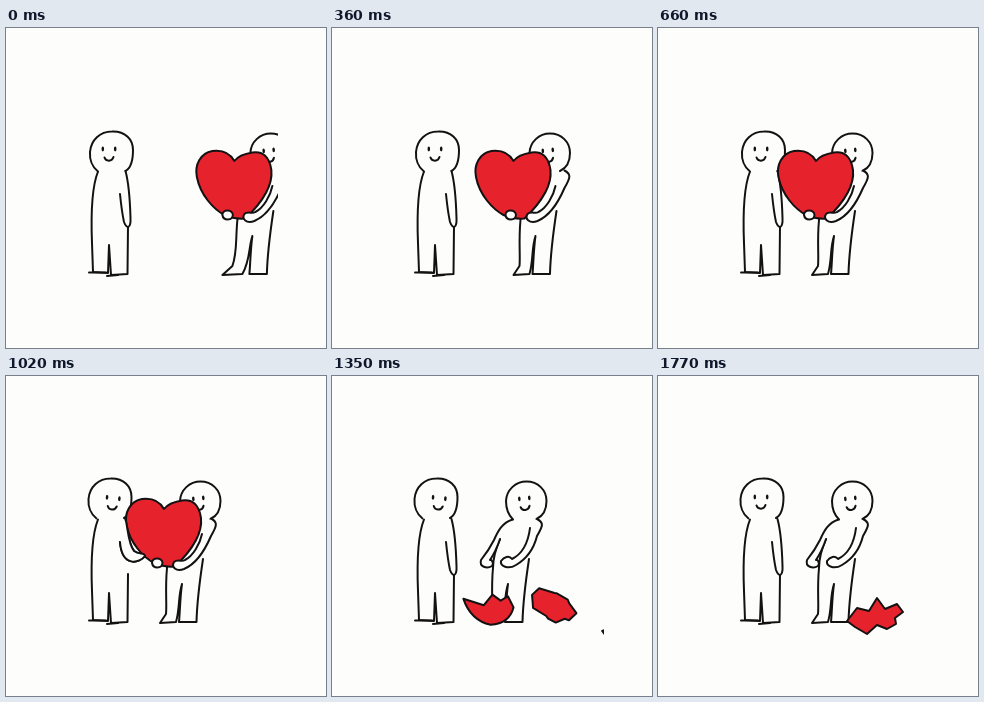
Animation of 320x320 px, one loop 1800 ms. Source, as an HTML page with a canvas:

```html
<!DOCTYPE html>
<html>
<head>
<meta charset="utf-8">
<style>
html, body { margin: 0; height: 100%; overflow: hidden; background: #fdfefc; }
canvas { display: block; }
</style>
</head>
<body>
<canvas width="320" height="320"></canvas>
<script>
const ctx = document.querySelector('canvas').getContext('2d');
const LOOP = 1800, PAPER = '#fdfefc', INK = '#141112', RED = '#e6232c';

const ramp = (t, a, b) => Math.min(1, Math.max(0, (t - a) / (b - a)));

// Piecewise linear value through [time, value] pairs
function track(t, keys) {
  let v = keys[0][1];
  for (let i = 1; i < keys.length; i++)
    v += (keys[i][1] - keys[i - 1][1]) * ramp(t, keys[i - 1][0], keys[i][0]);
  return v;
}

// Blend two paths that share the same commands
function morph(a, b, k) {
  const to = b.match(/[\d.]+/g);
  let i = 0;
  return a.replace(/[\d.]+/g, n => +n + (to[i++] - n) * k);
}

function draw(d, fill) {
  const path = new Path2D(d);
  if (fill) {
    ctx.fillStyle = fill;
    ctx.fill(path);
  }
  ctx.stroke(path);
}

function shifted(x, y, paint) {
  ctx.save();
  ctx.translate(x, y);
  paint();
  ctx.restore();
}

function face(x, y, gap, tilt) {
  shifted(x, y, () => {
    ctx.rotate(tilt);
    ctx.fillStyle = INK;
    for (const side of [-1, 1]) {
      ctx.beginPath();
      ctx.ellipse(side * gap, 0, 1.3, 2.4, 0, 0, 7);
      ctx.fill();
    }
    draw('M-4.5 8.5C-3 12.8 3 12.8 4.5 8');
  });
}

const heart = 'M158 133C153 124 144 122 136 123C124 125 118 137 120.5 149C124 167 137 181 148 187C155 190 163 191 169 190.5C181 179 197 161 195 142C193 128 186 123 176 124.5C167 126 161 129 158 133Z';

const leftArm = {
  idle: 'M119.5 143C123 156 124 172 124.5 190C125 200 121 202 118 194C116.5 187 115 176 114 166',
  hold: 'M119.5 143C122 152 122 168 128 175C133 179 139 176 139 180C134 187 116 192 114 166'
};

const rightArm = {
  hold: 'M205 142.5C212 146 211 150 205 160C199 174 190 188 178 193C170 196 165 191 168 186C171 183 176 186 179 184C187 180 194 168 196 158',
  free: 'M205 143C213 147 210 151 205 160C202 172 196 182 184 189C176 194 168 190 169 185C172 181 177 179 180 183C190 178 196 168 198 152'
};

const shards = [
  { x: 182, y: 230,
    from: 'M157 214L177 225L186 217L193 223L199 219L205 231Q202 246 185 247Q164 242 157 214Z',
    to: 'M96 235L117 235L125 221L135 227L144 222L149 232Q143 250 122 251Q104 248 96 235Z' },
  { x: 225, y: 220,
    from: 'M208 200L213 198L231 204L229 214L242 217L236 227L244 238L237 246L229 239L220 242L214 238L218 227L204 218Z',
    to: 'M189 245L199 232L211 235L219 222L227 233L239 228L245 236L237 242L238 248L229 253L219 249L209 258L197 251Z' },
  { x: 272, y: 225, fly: 60,
    from: 'M249 236L257 229L258 221L273 205L300 215L290 240L262 244L252 245Z' },
  { x: 248, y: 256, fly: 60,
    from: 'M245 255L250 253L251 258L248 259Z' }
];

function leftFigure(t, arm, kick) {
  const lean = ramp(t, 660, 840);
  const look = t < 1650 ? lean : 0;
  draw('M92 143.5C85 161 85 190 86 215L87 244L102 245L103 217L105 247L121.5 246L122 198', PAPER);
  if (kick) {
    ctx.fillStyle = PAPER;
    ctx.fillRect(99, 203, 26, 47);
    draw('M102 236C101 222 103 216 110 216C117 216 119 225 121 234');
    draw('M125 197C132 202 133 208 128 214L137 216');
  } else {
    draw('M101 248L112 247');
  }
  draw('M83 244.5L100 244.5');
  shifted(-1.5 * lean, -lean, () => {
    draw('M92 143.5C86 139 83.5 131 84 124C85 112 94 103.5 106 103.5C119 103 127 111 127 122C127 132 125 140 119.5 143', PAPER);
  });
  face(103 + 4.2 * look, 121 + look, 6.2, 0.12 * look);
  draw(arm, PAPER);
}

function rightBody(swing) {
  const foot = 154 - swing;
  draw(`M168 163C164 172 161 180 161 192C159 213 161 ${228 - swing / 2} ${160 - swing / 2} 238L${foot} 247L${170 - swing / 2} 246C174 232 172 220 176 208C174 222 174 236 173 246L190.5 246C191 225 194 203 197 183`, PAPER);
}

function rightHead() {
  draw('M181 143.5C176.5 139 174 132 174 125C174.5 114 183.5 105.5 194.5 105.5C206 105.5 214.5 114 214.5 125C214.5 134 211 140 204.5 143', PAPER);
  face(192.3, 122.3, 5, -0.1);
}

function rightArms(free) {
  if (free > 0.5) {
    draw('M180.5 143.5C170 147 166 155 162 164C158 172 153 179 149 184C147 191 155 193 160 190C163 186 158 183 158 184C162 178 165 172 168 163', PAPER);
  } else {
    draw('M146 187C146 181 156 181 156.5 187C156 193 147 193 146 187Z', PAPER);
  }
  draw(morph(rightArm.hold, rightArm.free, free), PAPER);
}

function drawShards(t) {
  const burst = ramp(t, 1140, 1200);
  const slide = ramp(t, 1200, 1560);
  shards.forEach((s, i) => {
    if (i > 1 && slide === 1) return;
    const kicked = i === 0 ? -115 * ramp(t, 1590, 1770) : 0;
    const x = (157 - s.x) * (1 - burst) + (s.fly || 0) * slide + kicked;
    const y = (210 - s.y) * (1 - burst);
    shifted(x, y, () => draw(morph(s.from, s.to || s.from, slide), RED));
  });
}

function render(t) {
  ctx.fillStyle = PAPER;
  ctx.fillRect(0, 0, 320, 320);
  ctx.save();
  ctx.beginPath();
  ctx.rect(48, 0, 224, 320);
  ctx.clip();
  ctx.lineWidth = 2;
  ctx.lineCap = ctx.lineJoin = 'round';
  ctx.strokeStyle = INK;

  const walk = track(t, [[0, 70.5], [360, 23.5], [540, 21], [660, 0]]);
  const sway = track(t, [[0, 0], [360, 4], [540, 4], [660, 0]]);
  const swing = track(t, [[0, 8], [360, 0], [540, 0], [600, 5], [660, 0]]);
  const reach = track(t, [[720, 0], [840, 1], [1080, 1], [1170, 0]]);
  const free = ramp(t, 1080, 1140);
  const arm = morph(leftArm.idle, leftArm.hold, reach);

  leftFigure(t, arm, t >= 1500 && t < 1650);
  shifted(walk + sway, 0, () => rightBody(swing));
  shifted(walk, 0, () => {
    rightHead();
    if (t < 1140) shifted(0, 55 * free * free, () => draw(heart, RED));
  });
  shifted(walk + sway, 0, () => rightArms(free));
  if (reach > 0.5) draw(arm, PAPER);
  if (t >= 1140) drawShards(t);
  ctx.restore();
}

const start = performance.now();
function tick() {
  render((performance.now() - start) % LOOP);
  requestAnimationFrame(tick);
}
tick();
</script>
</body>
</html>
```
